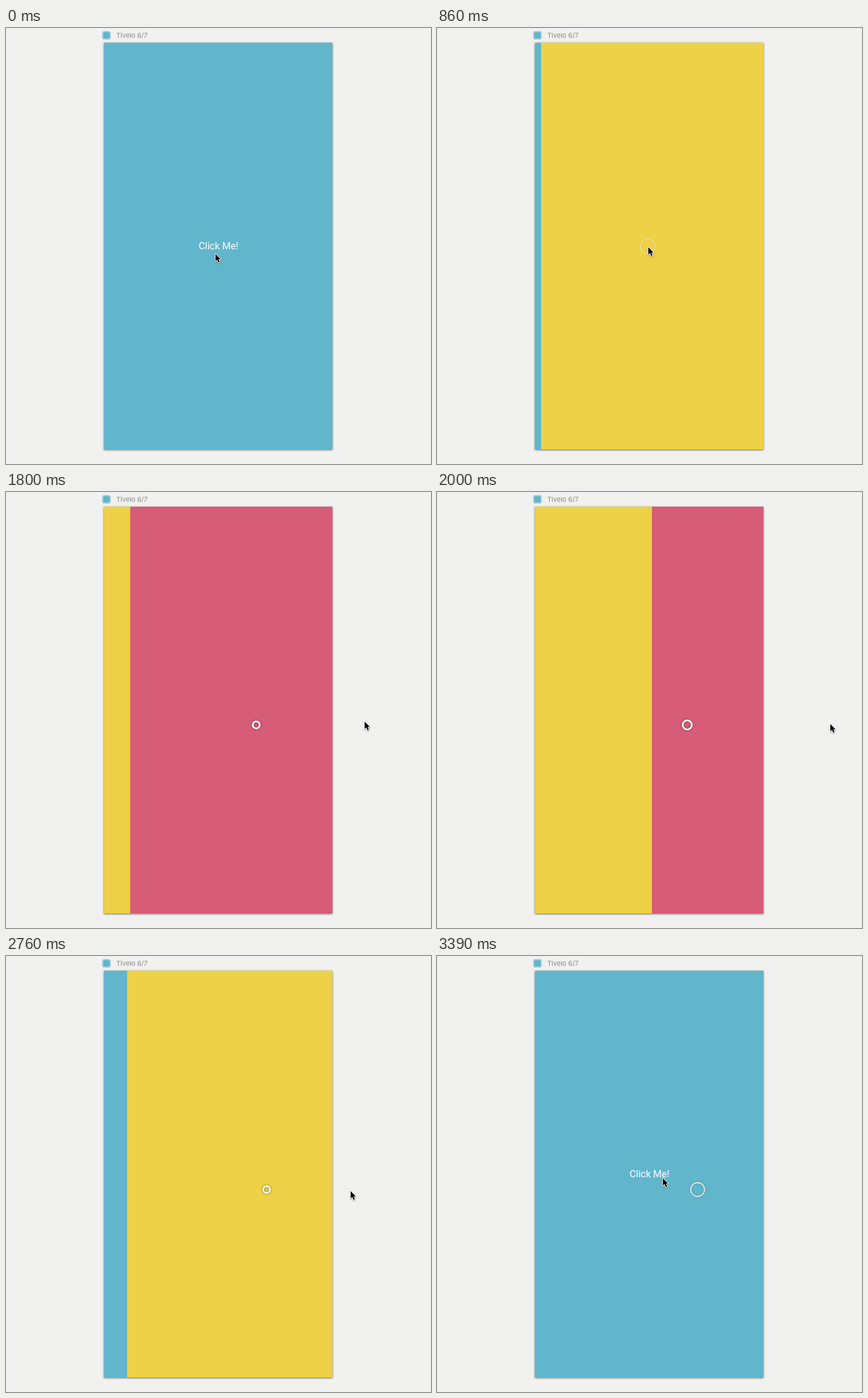
Animation, 698 px wide and 715 px high, one loop 4.39 s. Source, as an HTML page with a canvas:

```html
<!DOCTYPE html>
<html lang="en">
<head>
<meta charset="utf-8">
<title>Swipe between screens</title>
<style>
  html, body { margin: 0; width: 100%; height: 100%; overflow: hidden; background: #f1f1ef; }
  canvas { display: block; }
</style>
</head>
<body>
<canvas id="stage" width="698" height="715"></canvas>
<script>
const ctx = document.getElementById('stage').getContext('2d');
const LOOP = 4390;
const SLIDE = 750;
const board = { x: 161, y: 24, w: 375, h: 667 };
const colors = ['#61b6cc', '#eed146', '#d65c77'];

// One click scrolls two screens on, each swipe brings one back
const click = { press: 430, life: 470, x: 346, y: 358, slide: 491, screens: 2 };
const swipe = (press, x, y) => ({ press, life: 1000, x, y, slide: press + 21, screens: -1 });
const gestures = [click, swipe(1600, 411, 382), swipe(2572, 428, 383)];

const clamp = v => Math.min(1, Math.max(0, v));

function ease(t, start, end) {
  const u = clamp((t - start) / (end - start));
  return u < 0.5 ? 2 * u * u : 1 - 2 * (1 - u) ** 2;
}

function scrollAt(t) {
  return gestures.reduce((sum, g) => sum + g.screens * ease(t, g.slide, g.slide + SLIDE), 0);
}

// The pointer approaches the text, then swings right and back twice
function pointerAt(t) {
  const approach = ease(t, 30, 130);
  const out1 = ease(t, 1460, 1960);
  const back1 = ease(t, 1960, 2450);
  const out2 = ease(t, 2500, 2720);
  const back2 = ease(t, 2720, 3390);
  return {
    x: Math.round(343 + 3 * approach + 303 * out1 - 274 * back1 + 191 * out2 - 196 * back2),
    y: Math.round(369 - 11 * approach + 21 * out1 + 5 * out2 - 21 * back2)
  };
}

function shadow(color, blur, dy) {
  ctx.shadowColor = color;
  ctx.shadowBlur = blur;
  ctx.shadowOffsetY = dy;
}

function drawLabel() {
  ctx.beginPath();
  ctx.roundRect(159, 6, 12, 12, 2.5);
  ctx.fillStyle = colors[0];
  ctx.fill();
  ctx.lineWidth = 2;
  ctx.strokeStyle = '#9ccedb';
  ctx.stroke();
  ctx.font = '11px Inter, sans-serif';
  ctx.textAlign = 'left';
  ctx.fillStyle = '#888888';
  ctx.fillText('Tivelo 6/7', 181, 16);
}

function drawScreens(t) {
  const { x, y, w, h } = board;
  ctx.save();
  shadow('rgba(0,0,0,0.6)', 3, 1);
  ctx.fillStyle = colors[0];
  ctx.fillRect(x, y, w, h);
  ctx.restore();

  ctx.save();
  ctx.beginPath();
  ctx.rect(x, y, w, h);
  ctx.clip();
  const left = x - Math.round(scrollAt(t) * w);
  colors.forEach((color, i) => {
    ctx.fillStyle = color;
    ctx.fillRect(left + i * w, y, w, h);
  });
  ctx.font = '16px Roboto, sans-serif';
  ctx.textAlign = 'center';
  ctx.fillStyle = '#ffffff';
  ctx.fillText('Click Me!', left + w / 2 + 0.5, 363);
  ctx.restore();
}

// A ring that widens, thins and fades
function drawTouch(t, { press, life, x, y }) {
  const u = (t - press) / life;
  if (u < 0 || u >= 1) return;
  const fade = clamp((1 - u) * 4);
  ctx.save();
  ctx.globalAlpha = fade;
  shadow(`rgba(0,0,0,${0.6 * fade})`, 3, 0);
  ctx.lineWidth = 3 - clamp(u * 2 - 1);
  ctx.strokeStyle = '#ffffff';
  ctx.beginPath();
  ctx.arc(x, y, 3.9 + 9 * u, 0, 2 * Math.PI);
  ctx.stroke();
  ctx.restore();
}

function drawPointer({ x, y }) {
  const arrow = new Path2D('M1 1.5V13.6L3.7 11 5.8 15.8 8 14.9 6 10.2H9.6Z');
  ctx.save();
  ctx.translate(x, y);
  ctx.lineWidth = 2;
  ctx.lineJoin = 'round';
  ctx.strokeStyle = '#ffffff';
  shadow('rgba(0,0,0,0.4)', 2, 1);
  ctx.stroke(arrow);
  shadow('transparent', 0, 0);
  ctx.fillStyle = '#000000';
  ctx.fill(arrow);
  ctx.restore();
}

function draw(t) {
  ctx.fillStyle = '#f1f1ef';
  ctx.fillRect(0, 0, 698, 715);
  drawLabel();
  drawScreens(t);
  gestures.forEach(g => drawTouch(t, g));
  drawPointer(pointerAt(t));
}

const begin = performance.now();
function tick() {
  draw((performance.now() - begin) % LOOP);
  requestAnimationFrame(tick);
}
tick();
</script>
</body>
</html>
```
